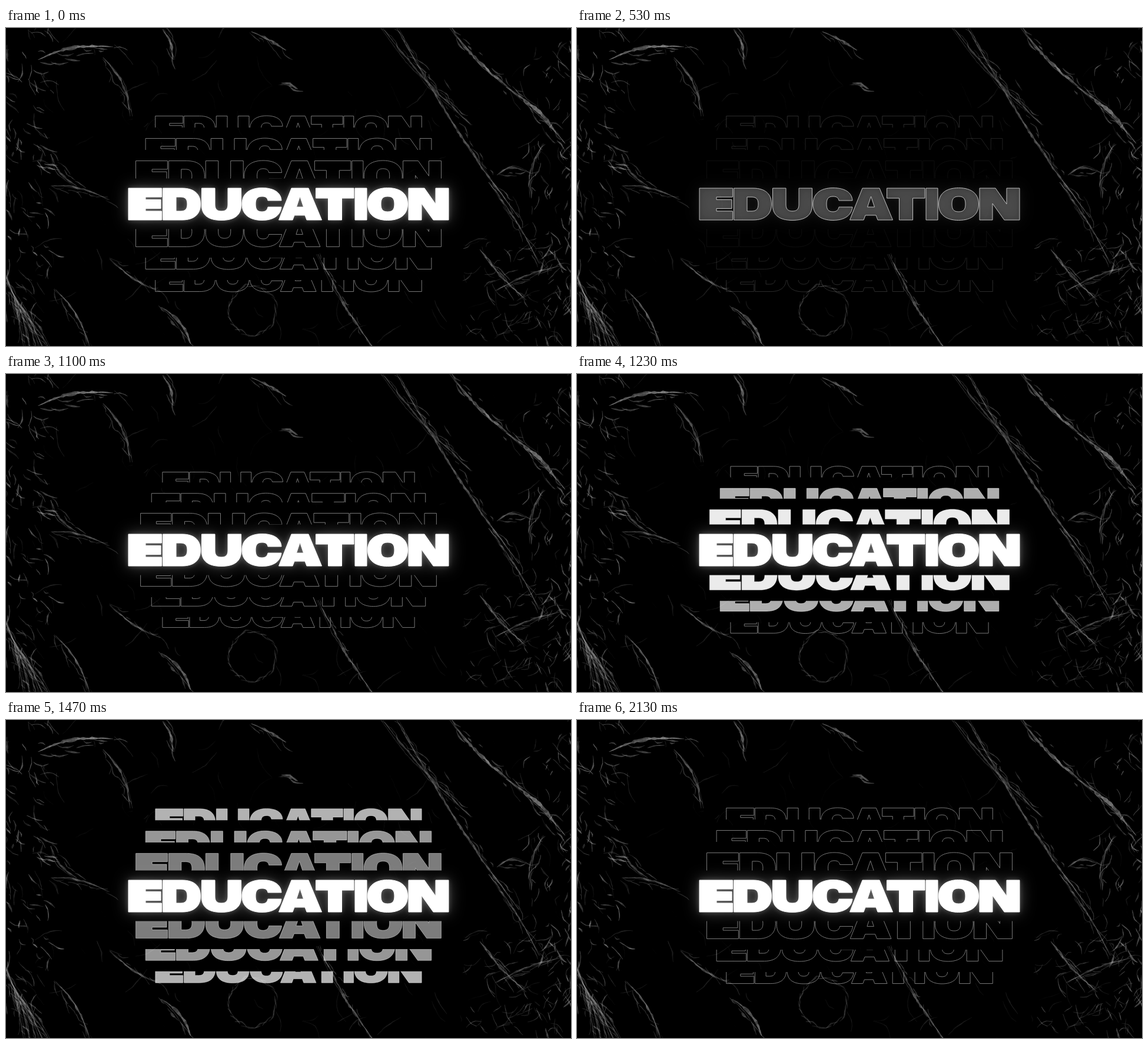
These frames come from a looping animation (960 px wide and 540 px high, 2.17 s). An HTML page with a canvas:

```html
<!DOCTYPE html>
<html lang="en">
<head>
<meta charset="utf-8">
<title>Education</title>
<style>
  html, body { margin: 0; width: 100%; height: 100%; overflow: hidden; background: #000; }
  canvas, svg { position: absolute; inset: 0; width: 100%; height: 100%; display: block; }
  path { fill-rule: evenodd; }
  .line { fill: none; stroke: #fff; stroke-width: 1; vector-effect: non-scaling-stroke; }
  .fill { fill: #fff; }
  #glow { filter: drop-shadow(0 0 4px rgba(255,255,255,.25)) drop-shadow(0 0 13px rgba(255,255,255,.3)); }
</style>
</head>
<body>
<canvas id="foil" width="960" height="540"></canvas>
<svg viewBox="0 0 960 540" role="img" aria-label="EDUCATION">
  <g id="rows"></g>
  <g id="main" transform="translate(0 272)"><g id="glow"></g></g>
</svg>
<script>
// ---------- crumpled foil ----------
const ctx = document.getElementById('foil').getContext('2d');
let seed = 77;
const rnd = () => {
  seed = (seed + 0x6D2B79F5) | 0;
  let t = Math.imul(seed ^ (seed >>> 15), 1 | seed);
  t = (t + Math.imul(t ^ (t >>> 7), 61 | t)) ^ t;
  return ((t ^ (t >>> 14)) >>> 0) / 4294967296;
};
const jit = r => (rnd() * 2 - 1) * r;

// a jagged sliver of light, built from facets of changing shade
function sliver(x0, y0, x1, y1, bow, width, light) {
  const dx = x1 - x0, dy = y1 - y0, len = Math.hypot(dx, dy);
  const nx = -dy / len, ny = dx / len, n = Math.max(3, Math.round(len / 5));
  let shine = rnd(), wob = 0, last = null;
  for (let i = 0; i <= n; i++) {
    const u = i / n, taper = Math.sin(Math.PI * u);
    shine += (rnd() - shine) * 0.5;
    wob = wob * 0.8 + jit(1);
    const off = bow * taper + wob * taper;
    const half = 0.35 + width * 0.5 * taper * (0.2 + 0.8 * rnd());
    const x = x0 + dx * u + nx * off, y = y0 + dy * u + ny * off;
    const edge = [x + nx * half, y + ny * half, x - nx * half, y - ny * half];
    if (last) {
      ctx.fillStyle = `rgba(190,190,190,${light * (0.25 + 0.75 * shine)})`;
      ctx.beginPath();
      ctx.moveTo(last[0], last[1]);
      ctx.lineTo(edge[0], edge[1]);
      ctx.lineTo(edge[2], edge[3]);
      ctx.lineTo(last[2], last[3]);
      ctx.fill();
    }
    last = edge;
  }
}
function shard(x, y, len, angle, width, light) {
  sliver(x, y, x + len * Math.cos(angle), y + len * Math.sin(angle), jit(len * 0.2), width, light);
}
// a long crease with splinters beside it
function fold(x0, y0, x1, y1, bow, width) {
  const light = 0.35 + width * 0.05;
  const len = Math.hypot(x1 - x0, y1 - y0), angle = Math.atan2(y1 - y0, x1 - x0);
  sliver(x0, y0, x1, y1, bow, width, light);
  sliver(x0 + jit(4), y0, x1 + jit(4), y1, bow + jit(4), 1, light * 0.6);
  for (let d = 0; d < len; d += 16) {
    const u = d / len;
    shard(x0 + (x1 - x0) * u + jit(width), y0 + (y1 - y0) * u + jit(width),
      8 + rnd() * 22, angle + jit(0.35), width * 0.4, light * 0.7);
  }
}

// the main creases: start, end, bow, width
[
  [640, 0, 790, 165, 6, 3], [664, 0, 872, 322, 8, 4], [820, 262, 906, 400, -5, 3],
  [754, 0, 860, 106, 6, 6], [850, 100, 950, 196, -6, 7], [834, 250, 886, 245, -12, 5],
  [914, 196, 890, 288, 10, 4], [530, 384, 622, 540, 4, 4], [54, 54, 182, 32, -10, 7],
  [165, 50, 211, 150, -10, 4], [266, 2, 284, 54, -5, 5], [76, 214, 120, 268, 6, 4],
  [76, 268, 174, 292, -8, 3], [84, 444, 142, 540, -8, 4], [176, 392, 262, 448, 6, 3],
  [264, 474, 314, 536, -8, 6], [416, 6, 476, 38, -3, 4], [466, 97, 496, 104, -4, 7],
  [805, 376, 884, 462, 4, 4], [832, 446, 942, 404, -6, 3]
].forEach(f => fold(...f));

// bundle in the lower left corner
for (let i = 0; i < 5; i++) fold(i * 4 - 8, 400 + i * 16, 30 + i * 11, 545, -6, 3);

// ring below the word
for (let a = 0; a < 6.28; a += 0.3) {
  shard(418 + 40 * Math.cos(a), 480 + 42 * Math.sin(a), 22, a + 1.75, 2, 0.3);
}
// both side edges, thinning out inwards
for (let i = 0; i < 230; i++) {
  const d = 75 * rnd() ** 2, right = i % 2;
  shard(right ? 960 - d : d, rnd() * 540 - 10, 8 + rnd() * 24, (right ? 1.5 : 1) + jit(0.9), 0.5 + rnd() * 3, 0.2 + rnd() * 0.5);
}
// crossing wrinkles in the lower right
for (let i = 0; i < 60; i++) {
  shard(770 + rnd() * 160, 370 + rnd() * 160, 10 + rnd() * 30, (i % 3 ? -0.55 : 0.9) + jit(0.3), 0.5 + rnd() * 1.5, 0.2 + rnd() * 0.3);
}
// loose wrinkles everywhere, brighter away from the middle
for (let i = 0; i < 150; i++) {
  const x = rnd() * 960, y = rnd() * 540;
  const far = Math.min(1, Math.hypot((x - 480) / 480, (y - 290) / 290));
  shard(x, y, 10 + rnd() * 45, (rnd() < 0.65 ? 1.1 : -0.6) + jit(0.3), 0.4 + rnd() * 2 * far, 0.4 * far * far * rnd());
}

// ---------- lettering, cap height 54 ----------
const letters = [
  'M208 0H264.5V15H237V19.5H263V34.5H237V39H264.5V54H208Z',
  'M266.5 0H299C320 0 330.5 10 330.5 27S320 54 299 54H266.5ZM289 15V39H297C305 39 308 35 308 27S305 15 297 15Z',
  'M332.5 0H355V28C355 36 359 39 366 39S377 36 377 28V0H399.5V29C399.5 46 388 54.5 366 54.5S332.5 46 332.5 29Z',
  'M468 21H445C444 16 441 14 435 14C427 14 424 18 424 27S427 40 435 40C441 40 444 37 445 32H468C466 47 454 54.5 435 54.5C413 54.5 401 44 401 27S413 -.5 435 -.5C455 -.5 467 7 468 21Z',
  'M463.5 54L485 0H514L536.5 54H511L508 46H490L487 54ZM499.5 14L493.5 32H505.5Z',
  'M526.5 0H591V17H570.5V54H547.5V17H526.5Z',
  'M593 0H613V54H593Z',
  'M648.5 -.5C671 -.5 682.5 10 682.5 27S671 54.5 648.5 54.5S614.5 44 614.5 27S626 -.5 648.5 -.5ZM648.5 14C640 14 637 18 637 27S640 40 648.5 40S660 36 660 27S657 14 648.5 14Z',
  'M684 0H711L730 27V0H752V54H726L706 26V54H684Z'
];
const word = letters.join('');

function el(name, attrs, parent) {
  const node = document.createElementNS('http://www.w3.org/2000/svg', name);
  for (const k in attrs) node.setAttribute(k, attrs[k]);
  return parent.appendChild(node);
}
const main = document.getElementById('main');
const glow = document.getElementById('glow');
const glyphs = letters.map(d => el('path', { d, class: 'fill' }, glow));
const edges = letters.map(d => el('path', { d, class: 'line' }, main));

const rowLayer = document.getElementById('rows');
const rows = [1, 2, 3].map(n => [-1, 1].map(dir => {
  const id = 'cut' + n + (dir > 0 ? 'low' : 'high');
  const rect = el('rect', { width: 960, height: 540 }, el('clipPath', { id }, rowLayer));
  const g = el('g', {}, el('g', { 'clip-path': `url(#${id})` }, rowLayer));
  const fill = el('path', { d: word, class: 'fill' }, g);
  const line = el('path', { d: word, class: 'line' }, g);
  return { dir, rect, g, fill, line };
}));

// ---------- motion ----------
const LOOP = 2170, MID = 298.5, HALF = 27, GAP = 18.5;
const ramp = (t, start, span) => Math.min(1, Math.max(0, (t - start) / span));
const smooth = u => u * u * (3 - 2 * u);

function drawRows(t) {
  const pose = t < 750 ? LOOP : t;   // spread out until faded away
  const squeeze = 1 - smooth(ramp(pose, 950, 550));
  let limit = 43;
  rows.forEach((pair, i) => {
    const n = i + 1, start = 910 - 40 * n;
    const shift = (7.5 + 39.7 * n) * (1 - Math.exp(-Math.max(0, pose - start) / 150));
    const size = 1.015 - 0.061 * n - 1.22 * squeeze * (0.0225 + 0.0075 * n);
    const lineAlpha = t < 750 ? 1 - ramp(t, 200, 300 + 75 * n) : ramp(t, start, 160);
    const peak = 1130 + 60 * n;
    const fillAlpha = ramp(t, peak - 60, 60) * (1 - ramp(t, peak, 620)) ** 1.2;
    for (const { dir, rect, g, fill, line } of pair) {
      g.setAttribute('transform', `translate(480 ${MID + dir * shift}) scale(${size}) translate(-480 ${-HALF})`);
      rect.setAttribute('y', dir < 0 ? MID - limit - 540 : MID + limit);
      fill.setAttribute('opacity', fillAlpha);
      line.setAttribute('opacity', 0.47 * lineAlpha);
    }
    limit = Math.max(limit, shift + HALF * size + GAP);
  });
}

function drawMain(t) {
  const out = ramp(t, 200, 500);
  letters.forEach((_, i) => {
    const lit = ramp(t, 730 + 35 * Math.abs(i - 4), 55);   // from the middle outwards
    glyphs[i].setAttribute('opacity', Math.max((1 - out) ** 1.45, lit));
    edges[i].setAttribute('opacity', lit === 1 ? 1 : 1 - 0.7 * out * out);
  });
}

const begin = performance.now();
function tick() {
  const t = (performance.now() - begin) % LOOP;
  drawRows(t);
  drawMain(t);
  requestAnimationFrame(tick);
}
tick();
</script>
</body>
</html>
```
